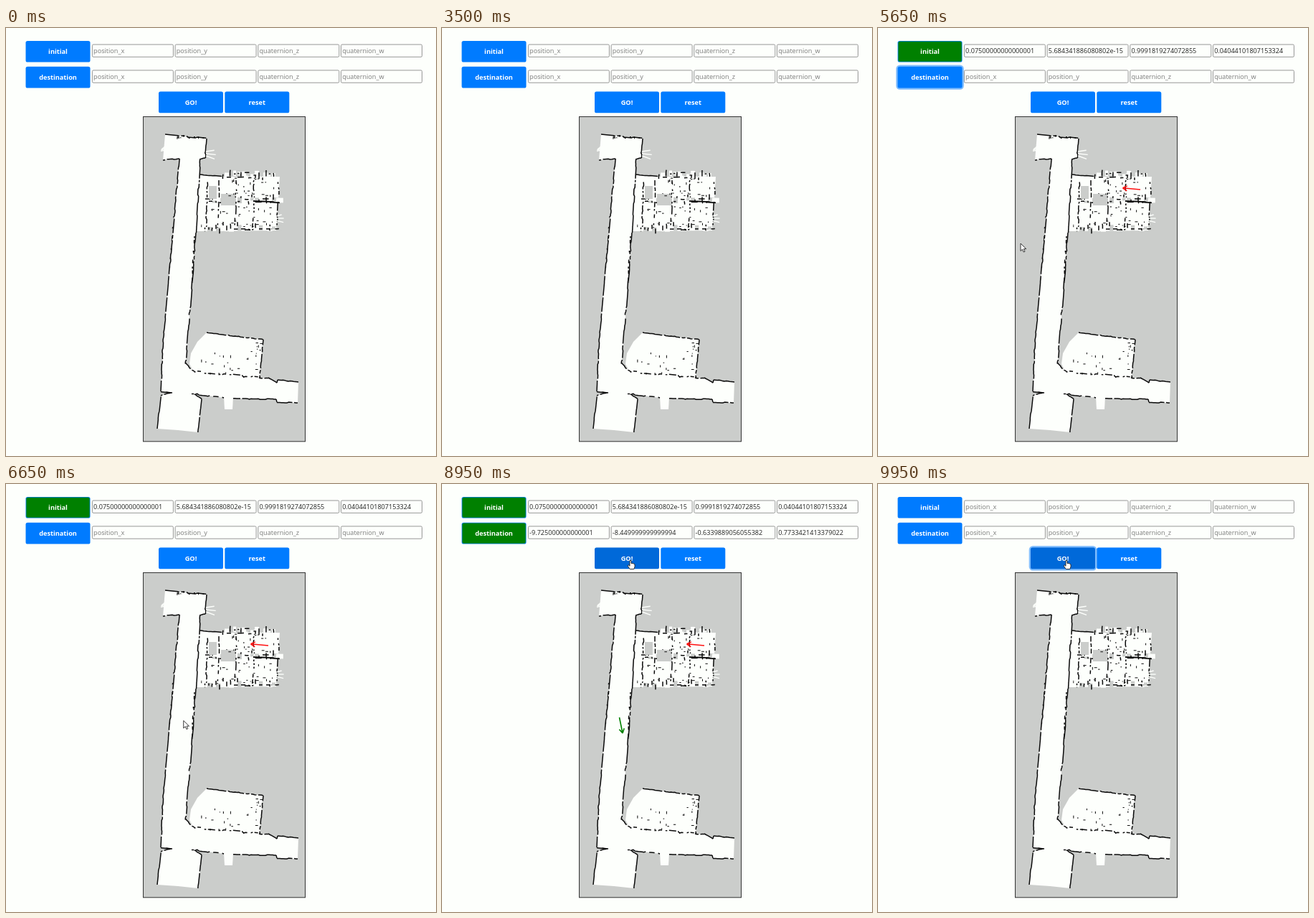
Recreate the animation shown at these times as an HTML page with a canvas. Size 600 by 596 pixels, loop 10000 ms.

```html
<!DOCTYPE html>
<html lang="en">
<head>
<meta charset="utf-8">
<title>Robot navigation</title>
<style>
  html, body { margin: 0; width: 600px; height: 596px; overflow: hidden; background: #fdfffc; }
  canvas { display: block; }
</style>
</head>
<body>
<canvas id="stage" width="600" height="596"></canvas>
<script>
const LOOP = 10000, STEP = 50, TRAVEL = 620, CLEAR = 9700;
const BLUE = '#007bff', HOVER = '#0069d9', GREEN = '#008000';
const GREY = '#cbcdcb', WHITE = '#fdfffc', INK = '#0a0a0a';
const FONT = '"Open Sans", "Noto Sans", sans-serif';
const HINTS = ['position_x', 'position_y', 'quaternion_z', 'quaternion_w'];
const BUTTON = { w: 90, h: 29.7 };

const poses = [
  { label: 'initial', y: 17.9, color: '#f11', focus: [1100, 2450], set: 3900,
    from: { x: 366, y: 225 }, to: { x: 341.5, y: 222.8 },
    values: ['0.07500000000000001', '5.684341886080802e-15', '0.9991819274072855', '0.04044101807153324'] },
  { label: 'destination', y: 53.8, color: GREEN, focus: [4950, 6500], set: 7200,
    from: { x: 247.5, y: 325 }, to: { x: 252, y: 347 },
    values: ['-9.725000000000001', '-8.449999999999994', '-0.6339889056055382', '0.7733421413379022'] }
];
const buttons = [
  ...poses.map(pose => ({ ...pose, x: 27.5 })),
  { label: 'GO!', x: 213, y: 88.6, focus: [CLEAR, LOOP] },
  { label: 'reset', x: 305.3, y: 88.6 }
];

// Pointer stops: arrival time, x, y
const stops = [
  [300, 205, 150], [900, 84, 21], [1800, 366, 224], [3750, 341, 223], [4850, 82, 70],
  [5650, 199, 300], [6280, 247, 326], [7100, 251, 345], [8700, 262, 106]
];
const hidden = t => t < 300 || (t >= 2600 && t < 3750);

const ctx = document.getElementById('stage').getContext('2d');
const mapImage = document.createElement('canvas');
mapImage.width = 600;
mapImage.height = 596;
const map = mapImage.getContext('2d');

let seed = 11;
function random() {
  seed = (seed * 16807) % 2147483647;
  return seed / 2147483647;
}
const between = (a, b) => a + random() * (b - a);

// A scanned wall: a line that shifts sideways now and then and breaks at gaps
function wall(x0, y0, x1, y1, gaps = 0.06, rough = 0.5, weight = 1.5) {
  const length = Math.hypot(x1 - x0, y1 - y0);
  const ux = (x1 - x0) / length, uy = (y1 - y0) / length;
  let shift = 0;
  map.strokeStyle = INK;
  map.lineWidth = weight;
  map.beginPath();
  map.moveTo(x0, y0);
  for (let d = 0; d < length; d += 2.5) {
    if (random() < 0.3) shift = between(-rough, rough);
    const end = Math.min(d + 2.5, length);
    const draw = random() < gaps ? 'moveTo' : 'lineTo';
    map[draw](x0 + ux * end - uy * shift, y0 + uy * end + ux * shift);
  }
  map.stroke();
}

function room(points, open = [], gaps, rough) {
  map.fillStyle = WHITE;
  map.beginPath();
  points.forEach(([x, y]) => map.lineTo(x, y));
  map.fill();
  points.forEach(([x, y], i) => {
    if (!open.includes(i)) wall(x, y, ...points[(i + 1) % points.length], gaps, rough);
  });
}

function specks(x, y, w, h, count) {
  map.fillStyle = INK;
  for (let i = 0; i < count; i++) {
    const long = between(1, 4);
    const size = random() < 0.5 ? [long, 1] : [1, long];
    map.fillRect(between(x, x + w), between(y, y + h), ...size);
  }
}

// Stray scan beams leaving a room
function beams(x, y, angle, length) {
  map.strokeStyle = WHITE;
  map.lineWidth = 1.4;
  for (let i = -1; i <= 1; i++) {
    const a = angle + i * 0.25, far = length * between(0.7, 1);
    map.beginPath();
    map.moveTo(x, y + i * 3);
    map.lineTo(x + far * Math.cos(a), y + i * 3 + far * Math.sin(a));
    map.stroke();
  }
}

function drawOffices() {
  room([[271, 204], [303, 207], [382, 207], [377, 282], [265, 283]], [1, 2, 3, 4]);
  for (const y of [206, 238, 277]) {
    for (let x = 275; x < 378; x += 6) {
      if (y === 206 && x < 303) continue;
      const edge = y === 206 ? -1 : 1, w = between(4, 10), h = between(3, 9);
      map.fillStyle = random() < 0.5 ? GREY : WHITE;
      map.fillRect(x, y + edge * between(0, 4) - h / 2, w, h);
    }
    for (let x = 278; x < 378; x += 5) {
      if (y === 206 && x < 303) continue;
      const cy = y + between(-6, 6), size = between(3, 9);
      if (random() < 0.5) wall(x, cy, x + size, cy, 0.1, 0.6);
      else wall(x, cy - size / 2, x, cy + size / 2, 0.1, 0.6);
    }
  }
  map.fillStyle = GREY;
  map.fillRect(283, 220, 11, 18);
  map.fillRect(300, 231, 21, 16);
  for (const x of [281, 297, 321, 346, 380]) {
    wall(x, 212, x, 236, 0.35, 0.9);
    wall(x, 242, x - 2, 278, 0.35, 0.9);
  }
  wall(345, 241, 382, 243, 0.05, 0.4, 1.8);
  specks(302, 203, 76, 34, 28);
  specks(272, 248, 102, 28, 30);
}

function drawMap() {
  map.fillStyle = GREY;
  map.fillRect(191, 123, 227, 453);
  map.strokeStyle = '#333';
  map.strokeRect(191.5, 123.5, 226, 452.3);

  drawOffices();
  room([[280, 424], [359, 434], [354, 488], [262, 479], [256, 468], [258, 453], [267, 437]], [2, 3, 4, 5, 6], 0.15);
  room([[304, 514], [317, 514], [316, 531], [305, 531]], [0, 1, 2, 3]);
  room([[216, 512], [232, 507], [259, 507], [273, 517], [268, 563], [240, 560], [211, 558]], [1, 4, 5]);
  // Hall, corridor and lower branch in one outline
  room([
    [222, 148], [280, 154], [278, 181], [271, 182], [265, 285], [251, 467], [262, 478],
    [353, 487], [366, 487], [378, 494], [379, 490], [408, 493], [407, 522], [378, 521],
    [377, 517], [317, 516], [304, 515], [259, 509], [232, 508], [216, 506],
    [220, 425], [235, 262], [242, 182], [219, 184]
  ], [6, 11, 15, 17, 23], 0.08, 0.8);
  wall(262, 478, 353, 487, 0.4, 1.2);
  wall(234, 262, 227, 350, 0.7, 0.4, 1);
  wall(263, 290, 259, 355, 0.5, 0.7);
  map.fillStyle = WHITE;
  map.fillRect(234, 504, 24, 8);

  specks(238, 149, 38, 4, 14);
  specks(270, 450, 80, 32, 20);
  specks(348, 437, 9, 25, 8);
  beams(279, 175, 0.1, 14);
  beams(223, 167, 2.7, 9);
  beams(377, 265, 0, 11);
  beams(292, 269, 2.8, 27);
}

function box(x, y, w, h, radius) {
  ctx.beginPath();
  ctx.roundRect(x, y, w, h, radius);
}

function write(text, x, y, color, font, align) {
  ctx.fillStyle = color;
  ctx.font = `${font} ${FONT}`;
  ctx.textAlign = align;
  ctx.fillText(text, x, y);
}

const clamp = v => Math.max(0, Math.min(1, v));
const isSet = (item, t) => t >= item.set && t < CLEAR;
const isOver = (b, p) => p.x >= b.x && p.x < b.x + BUTTON.w && p.y >= b.y && p.y < b.y + BUTTON.h;

function drawButton(b, t, over) {
  const [on, off] = b.focus || [LOOP, LOOP];
  const ring = clamp((t - on) / 150) * clamp((off + 150 - t) / 150);
  const grow = 2.3 * ring;
  if (ring > 0) {
    box(b.x - grow, b.y - grow, BUTTON.w + 2 * grow, BUTTON.h + 2 * grow, 3 + grow);
    ctx.fillStyle = `rgba(0, 123, 255, ${0.5 * ring})`;
    ctx.fill();
  }
  box(b.x, b.y, BUTTON.w, BUTTON.h, 2.6);
  ctx.fillStyle = over ? HOVER : BLUE;
  ctx.fill();
  if (isSet(b, t)) {
    box(b.x + 0.8, b.y + 0.8, BUTTON.w - 1.6, BUTTON.h - 1.6, 2);
    ctx.fillStyle = GREEN;
    ctx.fill();
  }
  write(b.label, b.x + BUTTON.w / 2, b.y + 18.5, '#fff', 'bold 9.2px', 'center');
}

function drawFields(pose, t) {
  const filled = isSet(pose, t), y = pose.y + 5.1;
  HINTS.forEach((hint, i) => {
    const x = 120.4 + i * 115.7;
    box(x, y, 113, 17.3, 1.6);
    ctx.strokeStyle = '#8c8c8c';
    ctx.lineWidth = 0.9;
    ctx.stroke();
    write(filled ? pose.values[i] : hint, x + 1.7, y + 12.2, filled ? '#222' : '#7b7b7b', '9.1px', 'left');
  });
}

function drawArrow({ from, to, color }) {
  const angle = Math.atan2(to.y - from.y, to.x - from.x);
  ctx.strokeStyle = color;
  ctx.lineWidth = 1.6;
  ctx.beginPath();
  ctx.moveTo(from.x, from.y);
  ctx.lineTo(to.x, to.y);
  for (const side of [-1, 1]) {
    const a = angle + side * Math.PI / 6;
    ctx.moveTo(to.x, to.y);
    ctx.lineTo(to.x - 7 * Math.cos(a), to.y - 7 * Math.sin(a));
  }
  ctx.stroke();
}

const arrowCursor = new Path2D('M0 0V10.5L2.5 8.2 4.2 12 6 11.2 4.4 7.6H7.8Z');
const handCursor = new Path2D('M0 .8Q1 -.5 2 .8V4.5Q5 3.9 7 6V9.2L5.8 12.5H.3L-2.6 8.4Q-3.2 6.7 -1.6 7L0 8.3Z');

function drawCursor(p, shape) {
  ctx.save();
  ctx.translate(p.x, p.y);
  ctx.fillStyle = '#fff';
  ctx.strokeStyle = '#222';
  ctx.lineWidth = 0.9;
  ctx.lineJoin = 'round';
  ctx.fill(shape);
  ctx.stroke(shape);
  ctx.restore();
}

// The pointer rests at each stop, then eases to the next one
function pointer(t) {
  let [, x, y] = stops[0];
  for (const [arrival, nextX, nextY] of stops.slice(1)) {
    const k = clamp((t - arrival + TRAVEL) / TRAVEL), ease = k * k * (3 - 2 * k);
    x += (nextX - x) * ease;
    y += (nextY - y) * ease;
  }
  return { x, y };
}

function render(t) {
  const p = pointer(t), visible = !hidden(t);
  const hovered = visible && buttons.find(b => isOver(b, p));
  ctx.fillStyle = WHITE;
  ctx.fillRect(0, 0, 600, 596);
  ctx.drawImage(mapImage, 0, 0);
  buttons.forEach(b => drawButton(b, t, b === hovered));
  for (const pose of poses) {
    drawFields(pose, t);
    if (isSet(pose, t)) drawArrow(pose);
  }
  if (visible) drawCursor(p, hovered ? handCursor : arrowCursor);
}

drawMap();
const start = performance.now();
function frame() {
  const t = (performance.now() - start) % LOOP;
  render(Math.floor(t / STEP) * STEP);
  requestAnimationFrame(frame);
}
frame();
</script>
</body>
</html>
```
